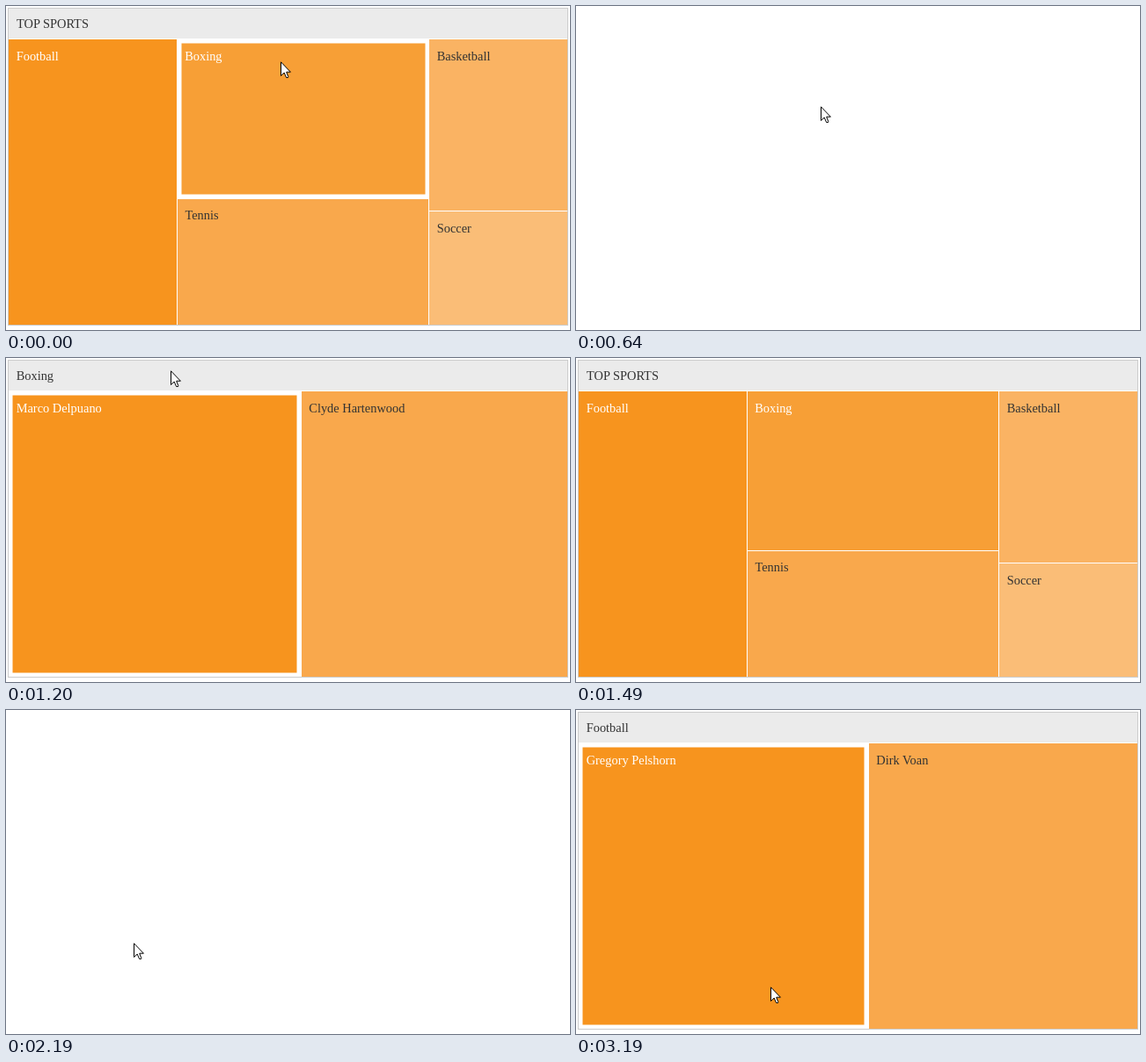
An HTML page that plays this animation: 641x369 px, repeating every 3.27 s.

```html
<!DOCTYPE html>
<html lang="en">
<head>
<meta charset="utf-8">
<title>Top sports treemap</title>
<style>
  html, body { margin: 0; width: 100%; height: 100%; overflow: hidden; background: #fff; }
  svg { display: block; width: 641px; height: 369px; }
  text { font: 14.4px "Liberation Serif", "Times New Roman", serif; fill: #333; }
  .light { fill: #fff; }
  .c1 { fill: #f7941e; }
  .c2 { fill: #f79f36; }
  .c3 { fill: #f9a84c; }
  .c4 { fill: #fab363; }
  .c5 { fill: #fabd77; }
  .hover { fill: none; stroke: #fff; stroke-width: 4.5; }

  /* every change is a hard cut; percentages are ms / 32.7 */
  .step { animation: 3270ms step-end infinite; }
  #panel { animation-name: panel; }
  #sports { animation-name: sports; }
  #boxing { animation-name: boxing; }
  #football { animation-name: football; }
  #overBoxing { animation-name: overBoxing; }
  #overFootball { animation-name: overFootball; }
  #pointer { animation-name: pointer; }
  #click { animation-name: click; }

  @keyframes panel {
    0%, 22.017%, 69.112% { opacity: 1; }
    19.571%, 66.971% { opacity: 0; }
  }
  @keyframes sports {
    0%, 43.118% { opacity: 1; }
    19.571%, 66.971%, 100% { opacity: 0; }
  }
  @keyframes boxing {
    0%, 43.118%, 100% { opacity: 0; }
    22.017% { opacity: 1; }
  }
  @keyframes football {
    0% { opacity: 0; }
    69.112%, 100% { opacity: 1; }
  }
  @keyframes overBoxing {
    0% { opacity: 1; }
    19.571%, 100% { opacity: 0; }
  }
  @keyframes overFootball {
    0%, 66.971%, 100% { opacity: 0; }
    55.351% { opacity: 1; }
  }
  @keyframes pointer {
    0% { transform: translate(312px, 63px); }
    5.198% { transform: translate(302px, 79px); }
    7.491% { transform: translate(288px, 101px); }
    9.785% { transform: translate(278px, 114px); }
    31.192% { transform: translate(208px, 36px); }
    36.696% { transform: translate(187px, 14px); }
    43.118% { transform: translate(181px, 0); }
    45.565% { transform: translate(181px, -40px); }
    55.351% { transform: translate(145px, 265px); }
    92.965% { transform: translate(166px, 277px); }
    95.106% { transform: translate(199px, 300px); }
    97.553%, 100% { transform: translate(221px, 315px); }
  }
  @keyframes click {
    0%, 19.571%, 43.118%, 66.971%, 100% { opacity: 0; }
    14.984%, 40.672%, 62.079% { opacity: 1; }
  }
</style>
</head>
<body>
<svg viewBox="0 0 641 369">
  <g id="panel" class="step">
    <path fill="#ccc" fill-rule="evenodd" d="M2 2h637v362H2zM3 3v360h635V3z"/>
    <rect x="3" y="3" width="635" height="34" fill="#ebebeb"/>
  </g>

  <g id="sports" class="step">
    <text x="12" y="25">TOP SPORTS</text>
    <rect class="c1" x="3" y="38" width="191" height="325"/>
    <rect class="c2" x="195" y="38" width="285" height="181"/>
    <rect class="c3" x="195" y="220" width="285" height="143"/>
    <rect class="c4" x="481" y="38" width="157" height="195"/>
    <rect class="c5" x="481" y="234" width="157" height="129"/>
    <rect id="overBoxing" class="hover step" x="197.25" y="40.25" width="281.5" height="176.5"/>
    <rect id="overFootball" class="hover step" x="5.25" y="40.25" width="186.5" height="320.5"/>
    <text class="light" x="11.7" y="62">Football</text>
    <text class="light" x="203.2" y="62">Boxing</text>
    <text x="203.4" y="243">Tennis</text>
    <text x="489.7" y="62">Basketball</text>
    <text x="489.7" y="258">Soccer</text>
  </g>

  <g id="boxing" class="step">
    <text x="11.7" y="25">Boxing</text>
    <rect class="c1" x="3" y="38" width="332" height="325"/>
    <rect class="c3" x="336" y="38" width="302" height="325"/>
    <rect class="hover" x="5.25" y="40.25" width="327.5" height="320.5"/>
    <text class="light" x="11.7" y="62">Marco Delpuano</text>
    <text x="344.3" y="62">Clyde Hartenwood</text>
  </g>

  <g id="football" class="step">
    <text x="11.7" y="25">Football</text>
    <rect class="c1" x="3" y="38" width="329" height="325"/>
    <rect class="c3" x="333" y="38" width="305" height="325"/>
    <rect class="hover" x="5.25" y="40.25" width="324.5" height="320.5"/>
    <text class="light" x="11.7" y="62">Gregory Pelshorn</text>
    <text x="341.3" y="62">Dirk Voan</text>
  </g>

  <g id="pointer" class="step">
    <g id="click" class="step" fill="none">
      <circle r="11.4" stroke="#000"/>
      <circle r="10.4" stroke="#fff"/>
    </g>
    <path d="M.5 .8V16.5L4.2 13L6.6 18.5H8.6L8.8 17.6L6.7 12.2H11.4Z" fill="#fff" stroke="#000"/>
  </g>
</svg>
</body>
</html>
```
